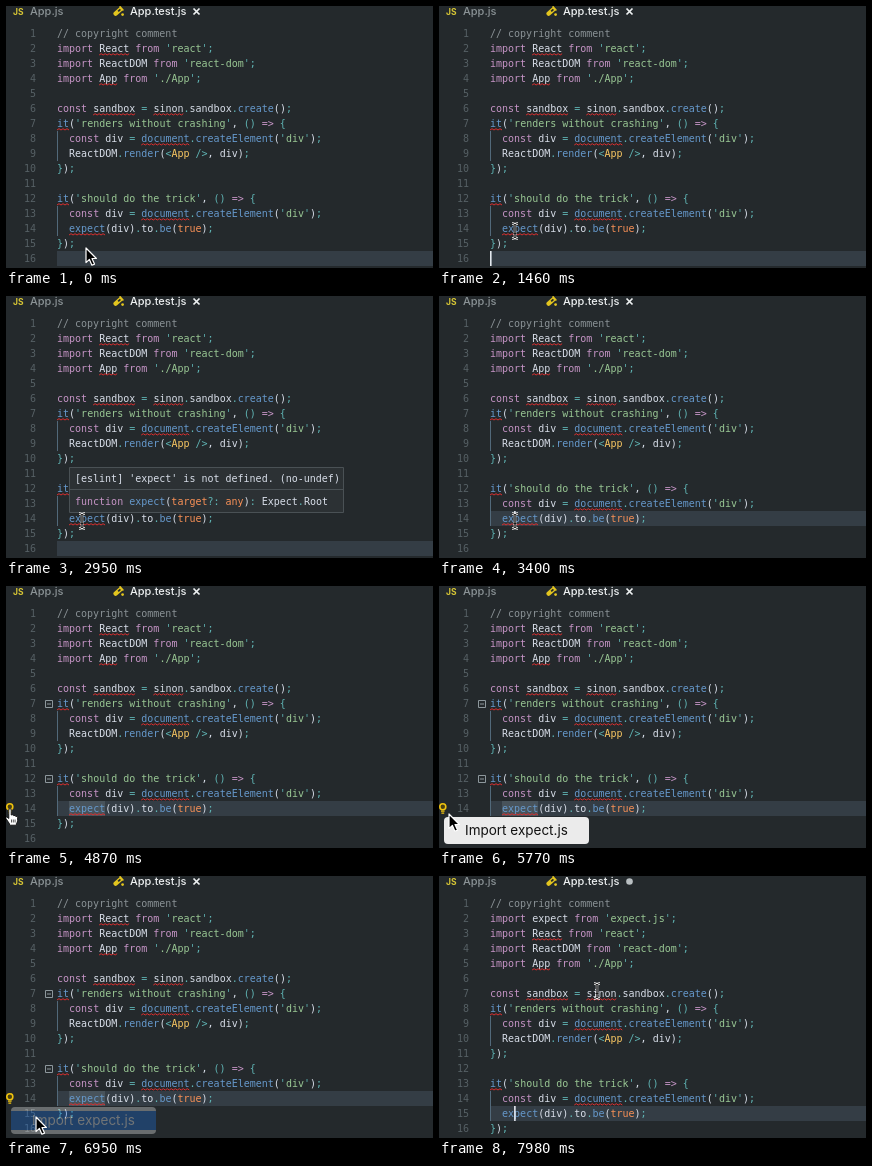
Animation of 427x262 px, one loop 8000 ms. Source, as an HTML page:

```html
<!DOCTYPE html>
<html lang="en">
<head>
<meta charset="utf-8">
<title>Import quick fix</title>
<style>
html, body { margin: 0; width: 100%; height: 100%; overflow: hidden; background: #24292c; }
svg { display: block; width: 427px; height: 262px; }
text { white-space: pre; }
.mono { font: 10px "DejaVu Sans Mono", monospace; fill: #d8dee9; }
.num { fill: #566065; text-anchor: end; }
.tab { font: 500 11px Inter, sans-serif; }
.comment { fill: #8a9296; }
.string { fill: #99c794; }
.key { fill: #c594c5; }
.fn { fill: #6699cc; }
.bool { fill: #f99157; }
.type { fill: #fac863; }
.op { fill: #5fb3b3; }
.wave { fill: none; stroke: #dc2f2f; stroke-width: 1; }
.menu { font: 13.5px Inter, sans-serif; }
</style>
</head>
<body>
<svg id="stage" viewBox="0 0 427 262">
  <rect width="427" height="262" fill="#24292c"/>
  <text x="7" y="9" font-family="Inter, sans-serif" font-size="8.5" font-weight="700" fill="#d6c535">JS</text>
  <text class="tab" x="24" y="9" fill="#8b9396">App.js</text>
  <g transform="translate(112 5.5) rotate(48)" fill="#e3c51f">
    <path d="M-2.8-5.5h5.6v1.5h-.6v7.2a2.2 2.2 0 0 1-4.4 0V-4h-.6z"/>
    <path d="M-.9-3.2h1.8v3h-1.8z" fill="#24292c"/>
  </g>
  <circle cx="116.6" cy="8.6" r="1.4" fill="#e3c51f"/>
  <text class="tab" x="124" y="9" fill="#eef1f2">App.test.js</text>
  <path id="close" d="M187.5 2.5l6 6m0-6l-6 6" stroke="#eef1f2" stroke-width="1.7"/>
  <circle id="dirty" cx="190.5" cy="5.5" r="3.3" fill="#b9bfc2"/>

  <rect id="active" x="51" width="376" height="15" fill="#343d45"/>
  <rect id="word" x="63" y="215" width="36" height="15" fill="#48535b"/>
  <g id="numbers"></g>
  <g id="before"></g>
  <g id="after"></g>
  <g id="folds" fill="none" stroke="#8d979c">
    <path d="M39.5 114.5h7v7h-7zM41 118h4M39.5 189.5h7v7h-7zM41 193h4"/>
  </g>
  <rect id="caret" width="1.6" height="15" fill="#e3e8ee"/>
  <g id="bulb">
    <circle cx="3.8" cy="220.8" r="3" fill="#4a4012" stroke="#f0c30f" stroke-width="1.6"/>
    <path d="M2 225.2h3.6M2.4 227.2h2.8" stroke="#f0c30f" stroke-width="1.3"/>
  </g>

  <g id="tip">
    <path d="M63.5 171.5h274v45h-274z" fill="#2c3134" stroke="#4a5155"/>
    <path d="M64 193.5h273" stroke="#4a5155"/>
  </g>

  <g id="menu">
    <rect x="5" y="231" width="145" height="27" rx="4" fill="#ebebeb"/>
    <rect id="chosen" x="5" y="235" width="145" height="19" fill="#1d6fd8"/>
    <text id="label" class="menu" x="26" y="249">Import expect.js</text>
  </g>

  <g id="arrow">
    <path d="M0 0v14.6l3.4-3.2 2.5 5.8 2.6-1.1-2.5-5.6h4.4z" fill="#000" stroke="#fff" stroke-width="1.2" stroke-linejoin="round"/>
  </g>
  <g id="beam" fill="none">
    <path id="bar" d="M-3-7.5q3 0 3 2v11q0 2-3 2M3-7.5q-3 0-3 2v11q0 2 3 2M-1.5 2.5h3" stroke="#fff" stroke-width="2.4"/>
    <path d="M-3-7.5q3 0 3 2v11q0 2-3 2M3-7.5q-3 0-3 2v11q0 2 3 2M-1.5 2.5h3" stroke="#111" stroke-width=".9"/>
  </g>
  <g id="hand">
    <path d="M-1.2 1q0-1.4 1.2-1.4T1.2 1v5q2-.8 2.3.6 2-.6 2.2.8 1.9-.4 1.9 1.2v3q0 1.5-1.2 3v1.6H-.5v-1.4L-4 9.6q-.7-1.6.8-1.7l2 1.6z" fill="#fff" stroke="#111" stroke-width=".9" stroke-linejoin="round"/>
    <path d="M1.5 10.5v3M3.3 10.5v3M5.1 10.5v3" stroke="#111" stroke-width=".7"/>
  </g>
</svg>
<script>
(() => {
  const LOOP = 8000, LEFT = 51, CHAR = 6.02, LINE = 15;
  const $ = id => document.getElementById(id);
  const lineTop = n => 20 + LINE * (n - 1);

  function add(parent, tag, attrs, content = '') {
    const el = document.createElementNS('http://www.w3.org/2000/svg', tag);
    for (const k in attrs) el.setAttribute(k, attrs[k]);
    el.textContent = content;
    parent.append(el);
    return el;
  }

  const SYNTAX = [
    ['comment', '\\/\\/.*'],
    ['string', "(?<=')[^']+(?=')"],
    ['key', '\\b(?:import|from|const|function)\\b|=>'],
    ['bool', '\\b(?:true|target|any)\\b'],
    ['type', '(?<=<)\\w+'],
    ['fn', '\\b(?:it|expect|document|createElement|render|create|be)(?=[(.])'],
    ['op', "[=;.<>/'{}?:]|\\(\\)(?= =>)"],
    ['plain', '\\w+|\\s+|.']
  ];
  const TOKEN = new RegExp(SYNTAX.map(([name, re]) => `(?<${name}>${re})`).join('|'), 'g');

  function write(parent, x, y, line) {
    const text = add(parent, 'text', { class: 'mono', x, y });
    for (const m of line.matchAll(TOKEN)) {
      const [kind] = SYNTAX.find(([name]) => m.groups[name] !== undefined);
      add(text, 'tspan', { class: kind }, m[0]);
    }
  }

  function underline(parent, row, col, length) {
    let d = `M${LEFT + col * CHAR} ${lineTop(row) + 14}`;
    for (let i = 0; i < length * CHAR / 2 - 0.5; i++) d += `l2 ${i % 2 ? 1.3 : -1.3}`;
    add(parent, 'path', { class: 'wave', d });
  }

  // Words between asterisks carry a lint underline.
  const code = `// copyright comment
import *React* from 'react';
import ReactDOM from 'react-dom';
import *App* from './App';

const *sandbox* = *sinon*.sandbox.create();
*it*('renders without crashing', () => {
  const div = *document*.createElement('div');
  ReactDOM.render(<App />, div);
});

*it*('should do the trick', () => {
  const div = *document*.createElement('div');
  *expect*(div).to.be(true);
});`.split('\n');

  function drawCode(parent, lines) {
    lines.forEach((line, i) => {
      const row = i + 1;
      let col = 0;
      line.split('*').forEach((part, k) => {
        if (k % 2) underline(parent, row, col, part.length);
        col += part.length;
      });
      write(parent, LEFT, lineTop(row) + 11, line.replaceAll('*', ''));
      if (line.startsWith('  ')) {
        add(parent, 'rect', { x: LEFT, y: lineTop(row), width: 1, height: LINE, fill: '#52697a' });
      }
    });
  }

  const edited = code.map(line => line.replace('*expect*', 'expect'));
  edited.splice(1, 0, "import expect from 'expect.js';");
  drawCode($('before'), code);
  drawCode($('after'), edited);
  for (let n = 1; n <= 16; n++) {
    add($('numbers'), 'text', { class: 'mono num', x: 30, y: lineTop(n) + 11 }, n);
  }

  add($('tip'), 'text', { class: 'mono', x: 69, y: 186 }, "[eslint] 'expect' is not defined. (no-undef)");
  write($('tip'), 69, 209, 'function expect(target?: any): Expect.Root');

  // Each track lists [start time, value...]; a value holds until the next start.
  const tracks = {
    mouse: [
      [0, 'arrow', 80, 242], [150, 'arrow', 80, 240],
      [1160, 'beam', 79, 234], [1310, 'beam', 77, 227], [1460, 'beam', 76, 225],
      [3840, 'beam', 72, 226], [3990, 'beam', 58, 227], [4140, 'arrow', 40, 227],
      [4280, 'arrow', 24, 227], [4430, 'arrow', 12, 226], [4580, 'hand', 6, 225], [4720, 'hand', 5, 224],
      [4870, 'hand', 4, 223],
      [5170, 'arrow', 3, 222], [5770, 'arrow', 10, 228], [5910, 'arrow', 22, 236], [6060, 'arrow', 30, 241],
      [7250, 'arrow', 40, 232], [7400, 'beam', 80, 194], [7550, 'beam', 125, 150],
      [7690, 'beam', 150, 124], [7840, 'beam', 158, 115]
    ],
    caret: [[0, 0], [570, 1], [1020, 0], [1460, 1], [2050, 0], [2500, 1], [2950, 0], [3400, 1],
      [3990, 0], [4430, 1], [4870, 0], [7100, 1], [7550, 0], [7980, 1]],
    row: [[0, 16], [3400, 14], [7100, 15]],
    tip: [[0, 0], [1760, 0.45], [1910, 1], [3400, 0]],
    word: [[0, 0], [3540, 1], [7100, 0]],
    bulb: [[0, 0], [3540, 1], [7100, 0]],
    folds: [[0, 0], [4140, 0.25], [4280, 0.5], [4430, 0.75], [4580, 1], [7400, 0.6], [7550, 0.25], [7690, 0]],
    menu: [[0, 0], [5170, 1], [6810, 0.35], [6960, 0]],
    chosen: [[0, 0], [5910, 1]]
  };

  const at = (name, t) => tracks[name].findLast(step => step[0] <= t).slice(1);
  const fade = (id, value) => $(id).setAttribute('opacity', Number(value));

  function render(t) {
    for (const id of ['caret', 'tip', 'word', 'bulb', 'folds', 'menu', 'chosen']) fade(id, at(id, t)[0]);

    const [row] = at('row', t);
    const isEdited = row === 15;
    $('active').setAttribute('y', lineTop(row));
    $('caret').setAttribute('y', lineTop(row));
    $('caret').setAttribute('x', row === 16 ? LEFT : LEFT + 4 * CHAR);
    $('folds').setAttribute('transform', `translate(0 ${isEdited ? LINE : 0})`);
    for (const id of ['before', 'close']) fade(id, !isEdited);
    for (const id of ['after', 'dirty']) fade(id, isEdited);
    $('label').setAttribute('fill', at('chosen', t)[0] ? '#fff' : '#111');

    const [shape, x, y] = at('mouse', t);
    for (const id of ['arrow', 'beam', 'hand']) fade(id, id === shape);
    $(shape).setAttribute('transform', `translate(${x} ${y})`);
  }

  const begin = performance.now();
  function tick() {
    render((performance.now() - begin) % LOOP);
    requestAnimationFrame(tick);
  }
  tick();
})();
</script>
</body>
</html>
```
